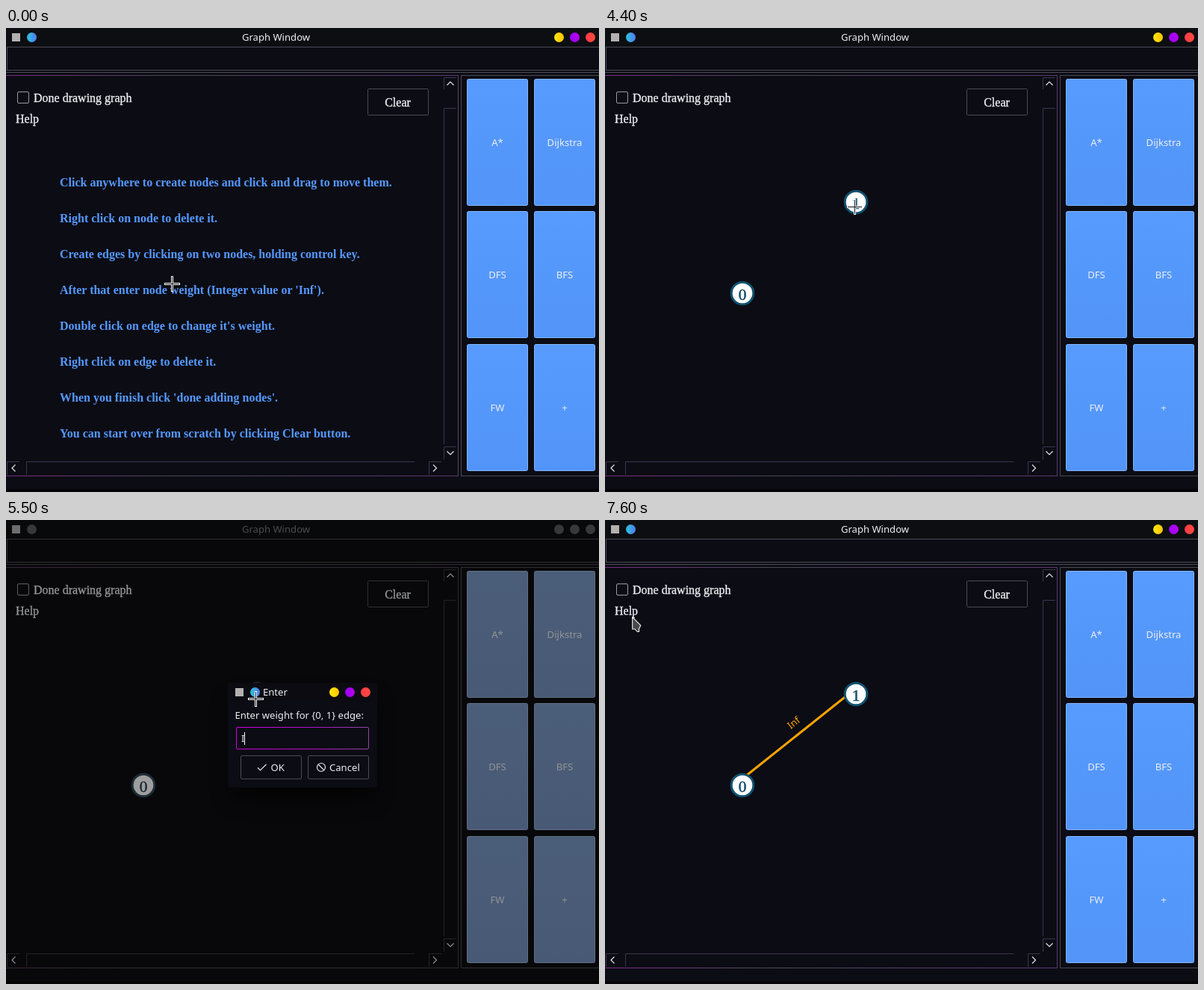
An HTML page for the animation above (8 s loop, 794 px wide and 621 px high).

```html
<!DOCTYPE html>
<html lang="en">
<head>
<meta charset="utf-8">
<title>Graph Window</title>
<style>
  html, body { margin: 0; width: 100%; height: 100%; overflow: hidden; background: #0c0c14; }
  svg { display: block; width: 100vw; height: 100vh; }
  text { font: 13.1px "Noto Sans", sans-serif; fill: #eceef2; white-space: pre; }
  .serif { font: 16px "Liberation Serif", serif; stroke: #eceef2; stroke-width: .35; }
  .help { font: bold 16px "Liberation Serif", serif; fill: #5599ff; }
  .digit { font: 21.3px "Liberation Serif", serif; fill: #0f4a6a; stroke: #0f4a6a; stroke-width: .5; }
  .mid { text-anchor: middle; }
  .line { fill: none; stroke: #4b4a56; }
  .bar { fill: none; stroke: #3a3550; }
  .icon { fill: none; stroke: #e4e4ea; stroke-width: 1.2; }
</style>
</head>
<body>
<svg id="stage" viewBox="0 0 794 621">
  <defs>
    <linearGradient id="app"><stop offset=".3" stop-color="#35b5dc"/><stop offset=".7" stop-color="#4a8af2"/></linearGradient>
    <linearGradient id="yellow"><stop stop-color="#ffe60a"/><stop offset="1" stop-color="#ffc400"/></linearGradient>
    <linearGradient id="purple"><stop stop-color="#9a00ff"/><stop offset="1" stop-color="#b800e8"/></linearGradient>
    <linearGradient id="red"><stop stop-color="#ff3b4e"/><stop offset="1" stop-color="#ff4a38"/></linearGradient>
    <linearGradient id="key" x2="0" y2="1"><stop stop-color="#579bff"/><stop offset="1" stop-color="#5294f8"/></linearGradient>
    <linearGradient id="frame"><stop stop-color="#7a2c86"/><stop offset=".35" stop-color="#4b4a56"/><stop offset="1" stop-color="#5d3a72"/></linearGradient>
    <linearGradient id="focus" x2="1" y2="0"><stop stop-color="#d000e0"/><stop offset=".6" stop-color="#b010c8"/><stop offset="1" stop-color="#8a4a9c"/></linearGradient>
    <filter id="blur" x="-50%" y="-50%" width="200%" height="200%"><feGaussianBlur stdDeviation="14"/></filter>
  </defs>
</svg>
<script>
const LOOP = 8000;
const stage = document.getElementById('stage');

function add(parent, tag, attrs = {}, content = '') {
  const el = document.createElementNS('http://www.w3.org/2000/svg', tag);
  for (const name in attrs) el.setAttribute(name, attrs[name]);
  el.textContent = content;
  return parent.appendChild(el);
}
const group = (parent, attrs) => add(parent, 'g', attrs);
const label = (parent, x, y, content, cls = '') => add(parent, 'text', { x, y, class: cls }, content);
const path = (parent, d, cls, extra = {}) => add(parent, 'path', { d, class: cls, ...extra });
const fill = (parent, x, y, width, height, color) =>
  add(parent, 'rect', { x, y, width, height, fill: color });
// Outlined box whose 1px border lies on whole pixels.
const box = (parent, x, y, w, h, extra = {}) =>
  add(parent, 'rect', { x: x + .5, y: y + .5, width: w - 1, height: h - 1, class: 'line', ...extra });
const dot = (parent, cx, cy, color) => add(parent, 'circle', { cx, cy, r: 6.5, fill: color });
const show = (el, on) => el.setAttribute('visibility', on ? 'visible' : 'hidden');

function controls(parent, xs, y, colors) {
  return xs.map((x, i) => dot(parent, x, y, colors[i]));
}
const LIT = ['url(#app)', 'url(#yellow)', 'url(#purple)', 'url(#red)'];
const GREY = LIT.map(() => '#5a5a5c');

// Main window
const win = group(stage);
fill(win, 0, 0, 794, 621, '#0c0c14');
fill(win, 0, 0, 794, 25, '#0d0e12');
fill(win, 0, 617, 794, 4, '#050509');
fill(win, 8, 7, 11, 11, '#b3b0b0');
const title = label(win, 361.5, 17, 'Graph Window', 'mid');
const lights = controls(win, [34.5, 740.5, 761.5, 782.5], 12.5, LIT);
box(win, 1, 25, 800, 32);
path(win, 'M0 59.5H794', 'line');
box(win, -1, 63, 607, 537, { style: 'stroke:url(#frame)' });
box(win, 609, 63, 200, 537);

box(win, 15, 85, 16, 16, { rx: 1.5, style: 'stroke:#9a9aa0' });
label(win, 37, 99, 'Done drawing graph', 'serif');
label(win, 13, 127, 'Help', 'serif');
box(win, 484, 81, 82, 36, { rx: 1 });
label(win, 524.5, 105, 'Clear', 'serif mid');

path(win, 'M586.5 82V66.5H603M586.5 557V107.5H603M586.5 578V560.5H603', 'bar');
path(win, 'M1.5 598V580.5H18M27.5 598V580.5H547M566.5 598V580.5H583', 'bar');
path(win, 'M590.5 76.5l4.5-4.5 4.5 4.5M590.5 566.5l4.5 4.5 4.5-4.5', 'icon');
path(win, 'M12.5 584.5l-4.5 4.5 4.5 4.5M572 584.5l4.5 4.5-4.5 4.5', 'icon');

['A*', 'Dijkstra', 'DFS', 'BFS', 'FW', '+'].forEach((name, i) => {
  const x = 617 + i % 2 * 90, y = 68 + Math.floor(i / 2) * 177.4;
  box(win, x, Math.round(y), 82, 170, { rx: 2, style: 'fill:url(#key);stroke:#84b6ff' });
  label(win, x + 41, Math.round(y) + 90, name, 'mid');
});

// Canvas contents
const help = group(win);
[
  'Click anywhere to create nodes and click and drag to move them.',
  'Right click on node to delete it.',
  'Create edges by clicking on two nodes, holding control key.',
  "After that enter node weight (Integer value or 'Inf').",
  "Double click on edge to change it's weight.",
  'Right click on edge to delete it.',
  "When you finish click 'done adding nodes'.",
  'You can start over from scratch by clicking Clear button.'
].forEach((line, i) => label(help, 72, 212 + 48 * i, line, 'help'));

const edge = group(win);
path(edge, 'M188 343L325 234', '', { stroke: '#ffa500', 'stroke-width': 3 });
add(edge, 'text', { class: 'mid', transform: 'translate(255.5 275) rotate(-38.7)', style: 'fill:#ffa500' }, 'Inf');

const nodes = [[184, 355], [336, 233]].map(([cx, cy], i) => {
  const node = group(win);
  add(node, 'circle', { cx, cy, r: 14.8, fill: '#fff', stroke: '#11516f', 'stroke-width': 3 });
  label(node, cx, cy + 9, i, 'digit mid');
  return node;
});

// Weight dialog
const dialog = group(stage);
add(dialog, 'rect', { x: 302, y: 240, width: 190, height: 134, opacity: .6, filter: 'url(#blur)' });
add(dialog, 'rect', { x: 297, y: 218, width: 200, height: 140, rx: 3, fill: '#0c0c15' });
fill(dialog, 299, 218, 196, 25, '#0b0b11');
fill(dialog, 307, 225, 11, 11, '#b3b0b0');
controls(dialog, [333.5, 439.5, 460.5, 481.5], 230.5, LIT);
label(dialog, 344, 235, 'Enter');
label(dialog, 306.5, 266, 'Enter weight for {0, 1} edge:');
const field = box(dialog, 308, 277, 178, 30, { rx: 1.5 });
const selection = fill(dialog, 315, 283, 8, 18, '#c200d4');
const value = label(dialog, 315, 297, '');
const caret = fill(dialog, 0, 284, 1, 17, '#fff');
box(dialog, 314, 315, 82, 32, { rx: 1.5 });
box(dialog, 404, 315, 82, 32, { rx: 1.5 });
path(dialog, 'M337 331.5l3.5 3.5 8-8', 'icon');
path(dialog, 'M416.5 331a5.5 5.5 0 1 0 11 0a5.5 5.5 0 1 0-11 0M418 327l8 8', 'icon');
label(dialog, 354.5, 336, 'OK');
label(dialog, 433, 336, 'Cancel');

// Pointers, each drawn around its own hot spot
const cross = group(stage);
path(cross, 'M-10 .5H11M.5-10V11', '', { stroke: '#fff', 'stroke-width': 3 });
path(cross, 'M-9 .5H10M.5-9V10', '', { stroke: '#14141a', 'stroke-width': 1 });
const arrow = group(stage);
path(arrow, 'M.7 .9V17H4L7.2 20.5H9.5V16.5L11.8 12.2Z', '',
  { fill: '#48484a', stroke: '#f4f4f4', 'stroke-width': 1.1, 'stroke-linejoin': 'round' });

// Pointer table: time, shape, x, y
const glide = Array.from({ length: 8 }, (_, i) => {
  const u = (i + 1) / 8, e = u * u * (3 - 2 * u);
  return [1400 + 100 * i, cross, Math.round(174 + 152 * e), Math.round(362 - 122 * e)];
});
const pointer = [
  [0, cross, 222, 342], [100, cross, 198, 353], [200, cross, 176, 362], [500, cross, 174, 362],
  ...glide,
  [2200, null, 326, 240], [2300, cross, 326, 240], [2500, cross, 264, 300], [2600, cross, 209, 345],
  [4400, cross, 334, 239], [4600, arrow, 333, 238], [5500, cross, 334, 239],
  [6900, cross, 222, 211], [7200, cross, 94, 152], [7600, arrow, 36, 129]
];
// Dialog table: time, opacity, field text, caret x (0 = text selected), window filter
const prompts = [
  [0, 0, '', 0, 'none'],
  [5300, 1, '0', 0, 'saturate(.57) brightness(.69)'],
  [5500, 1, 'I', 319, 'saturate(.44) brightness(.62)'],
  [5700, 1, 'In', 327, 'saturate(.44) brightness(.62)'],
  [5900, 1, 'Inf', 332, 'saturate(.43) brightness(.61)'],
  [6700, .04, 'Inf', 332, 'none'],
  [6900, 0, '', 0, 'none']
];
const current = (table, t) => table.findLast(row => row[0] <= t);

function render(t) {
  show(help, t < 1000);
  show(nodes[0], t >= 1000);
  show(nodes[1], t >= 2200);
  show(edge, t >= 6700);

  const active = t < 5000 || t >= 6700;
  title.style.fill = active ? '#eceef2' : '#7b7b7e';
  lights.forEach((light, i) => light.setAttribute('fill', (active ? LIT : GREY)[i]));

  const [, opacity, entry, caretX, dim] = current(prompts, t);
  win.style.filter = dim;
  dialog.setAttribute('opacity', opacity);
  value.textContent = entry;
  show(selection, !caretX);
  show(caret, caretX);
  caret.setAttribute('x', caretX);
  field.style.stroke = caretX ? 'url(#focus)' : '#5b5268';

  const [, shape, x, y] = current(pointer, t);
  for (const p of [cross, arrow]) {
    show(p, p === shape);
    p.setAttribute('transform', `translate(${x} ${y})`);
  }
}

const start = performance.now();
function tick() {
  render((performance.now() - start) % LOOP);
  requestAnimationFrame(tick);
}
tick();
</script>
</body>
</html>
```
